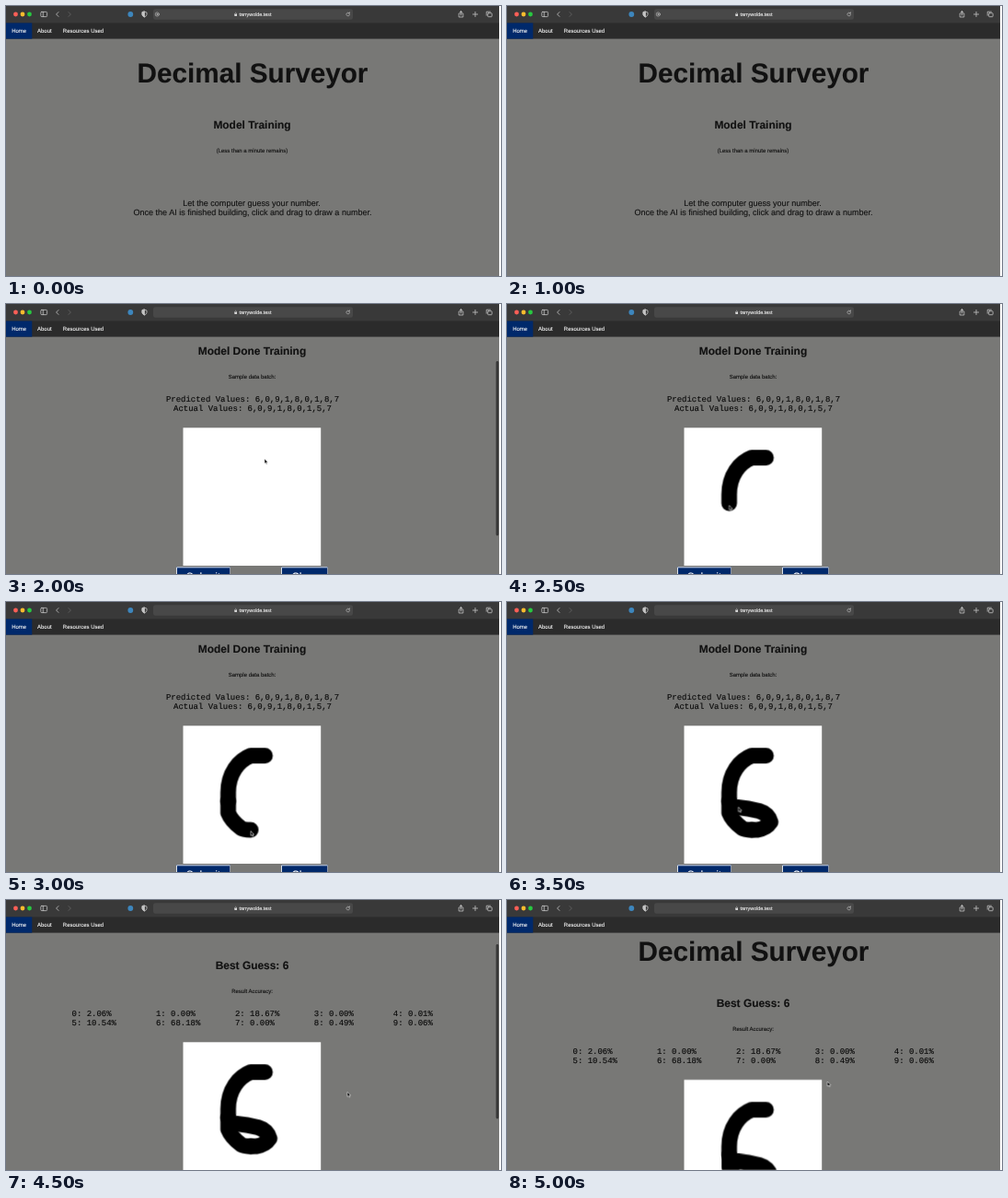
These frames come from a looping animation (538 by 293 pixels, 5500 ms). An HTML page:

```html
<!DOCTYPE html>
<html lang="en">
<head>
<meta charset="utf-8">
<title>Digit guessing demo</title>
<style>
  html, body { margin: 0; width: 100%; height: 100%; overflow: hidden; background: #fff; }
  svg { display: block; width: 538px; height: 293px; }
  text { font-family: "Liberation Sans", Arial, sans-serif; text-rendering: geometricPrecision; white-space: pre; }

  .page text { fill: #111; stroke: #111; stroke-width: .12px; text-anchor: middle; }
  .page .title { font-size: 29.7px; font-weight: bold; }
  .page .heading { font-size: 11.95px; font-weight: bold; }
  .page .note { font-size: 6px; }
  .page .lead { font-size: 9.04px; }
  .page .mono { font: 8.96px "Liberation Mono", "Courier New", monospace; fill: #080808; stroke: #080808; }
  .page .left { text-anchor: start; }
  .page .label { font-size: 12px; fill: #fff; stroke: #fff; }
  .ink path { fill: none; stroke: #000; stroke-width: 17; stroke-linecap: round; stroke-linejoin: round; }
  .lit { fill: none; stroke: #dde2ea; }
  .shade { fill: none; stroke: #8b95a8; }
  .icons { fill: none; stroke: #c4c4c4; stroke-width: .8; stroke-linecap: round; stroke-linejoin: round; }
  .bar text { fill: #f6f6f6; stroke: #f6f6f6; stroke-width: .1px; font-size: 6px; }
  .bar .address { font-size: 5.4px; }

  /* Eleven half-second holds per loop */
  .anim { animation: 5.5s step-end infinite; }
  .page { animation-name: scroll; }
  .training { animation-name: training; }
  .done { animation-name: done; }
  .result { animation-name: result; }
  .board { animation-name: board; }
  .ink1 { animation-name: ink1; }
  .ink2 { animation-name: ink2; }
  .ink3 { animation-name: ink3; }
  .hover { animation-name: hover; }
  .thumb { animation-name: thumb; }
  .info { animation-name: info; }
  .cursor { animation-name: cursor; }

  @keyframes scroll {
    0% { transform: translateY(0); }
    36.363% { transform: translateY(-78px); }
    72.727% { transform: translateY(-109.3px); }
    81.818% { transform: translateY(-58px); }
    90.909%, 100% { transform: translateY(-17.2px); }
  }
  @keyframes training { 0% { opacity: 1; } 27.272%, 100% { opacity: 0; } }
  @keyframes done { 0% { opacity: 0; } 27.272% { opacity: 1; } 81.818%, 100% { opacity: 0; } }
  @keyframes result { 0% { opacity: 0; } 81.818%, 100% { opacity: 1; } }
  @keyframes board { 0% { opacity: 0; } 27.272%, 100% { opacity: 1; } }
  @keyframes ink1 { 0% { opacity: 0; } 45.454%, 100% { opacity: 1; } }
  @keyframes ink2 { 0% { opacity: 0; } 54.545%, 100% { opacity: 1; } }
  @keyframes ink3 { 0% { opacity: 0; } 63.636%, 100% { opacity: 1; } }
  @keyframes hover { 0% { opacity: 0; } 72.727% { opacity: 1; } 81.818%, 100% { opacity: 0; } }
  @keyframes info { 0% { opacity: 1; } 36.363%, 100% { opacity: 0; } }
  @keyframes thumb {
    0% { opacity: 0; transform: translateY(0); }
    36.363% { opacity: 1; transform: translateY(14px); }
    45.454% { opacity: 0; transform: translateY(0); }
    81.818% { opacity: 1; transform: translateY(0); }
    90.909%, 100% { opacity: 0; transform: translateY(0); }
  }
  @keyframes cursor {
    0% { opacity: 0; transform: translate(281px, 168px); }
    36.363% { opacity: 1; transform: translate(281px, 168px); }
    45.454% { opacity: 1; transform: translate(241.5px, 218.5px); }
    54.545% { opacity: 1; transform: translate(266px, 248.5px); }
    63.636% { opacity: 1; transform: translate(251.5px, 222.5px); }
    72.727% { opacity: 1; transform: translate(224.8px, 275.5px); }
    81.818% { opacity: 1; transform: translate(371px, 208.3px); }
    90.909%, 100% { opacity: 1; transform: translate(348.3px, 197px); }
  }
</style>
</head>
<body>
<svg viewBox="0 0 538 293">
  <rect width="536" height="293" fill="#787876"/>

  <g class="page anim">
    <text class="title" x="268" y="82.9">Decimal Surveyor</text>

    <g class="training anim">
      <text class="heading" x="267.5" y="133">Model Training</text>
      <text class="note" x="267.5" y="159">(Less than a minute remains)</text>
      <text class="lead" x="267" y="216.6">Let the computer guess your number.</text>
      <text class="lead" x="268" y="227">Once the AI is finished building, click and drag to draw a number.</text>
    </g>

    <g class="done anim">
      <text class="heading" x="267.5" y="133">Model Done Training</text>
      <text class="note" x="267.5" y="159">Sample data batch:</text>
      <text class="mono" x="268" y="184.1">Predicted Values: 6,0,9,1,8,0,1,8,7</text>
      <text class="mono" x="268" y="194.4">Actual Values: 6,0,9,1,8,0,1,5,7</text>
    </g>

    <g class="result anim">
      <text class="heading" x="267.5" y="133">Best Guess: 6</text>
      <text class="note" x="267.5" y="159">Result Accuracy:</text>
      <text class="mono left" x="71.6" y="184.1">0: 2.06%         1: 0.00%        2: 18.67%       3: 0.00%        4: 0.01%</text>
      <text class="mono left" x="71.6" y="194.4">5: 10.54%        6: 68.18%       7: 0.00%        8: 0.49%        9: 0.06%</text>
    </g>

    <g class="board anim">
      <g class="ink" transform="translate(192.5 212.3)">
        <rect width="149.7" height="149.7" fill="#fff"/>
        <path class="ink1 anim" d="M89 32.5H73.5C60.5 37.5 49 51.5 49 72.5V82"/>
        <path class="ink2 anim" d="M49 82V94.5Q52.5 103.5 63.5 111.5Q65.5 113 73.5 113"/>
        <path class="ink3 anim" d="M73.5 113H79.5Q89.5 111.5 94 104.5Q91.5 95.5 81.5 92.5Q69.5 89.5 58.5 88.5"/>
      </g>
      <g transform="translate(185 363.3)">
        <rect width="59" height="21.5" fill="#00296b"/>
        <rect class="hover anim" width="59" height="21.5" fill="#0a5cff"/>
        <path class="shade" d="M.5 21H58.5V.5"/>
        <path class="lit" d="M.5 21V.5H58.5"/>
        <text class="label" x="29.5" y="15.2">Submit</text>
      </g>
      <g transform="translate(299 363.3)">
        <rect width="51" height="21.5" fill="#00296b"/>
        <path class="shade" d="M.5 21H50.5V.5"/>
        <path class="lit" d="M.5 21V.5H50.5"/>
        <text class="label" x="25.5" y="15.2">Clear</text>
      </g>
    </g>
  </g>

  <rect class="thumb anim" x="532.6" y="48" width="2.8" height="189.5" rx="1.4" fill="#363636"/>

  <g class="bar">
    <rect width="536" height="35.6" fill="#2b2b2b"/>
    <rect width="536" height="18.4" fill="#393939"/>
    <rect y="18.4" width="28.3" height="17.2" fill="#00296b"/>
    <text x="6.2" y="29.2">Home</text>
    <text x="34" y="29.2">About</text>
    <text x="61.8" y="29.2">Resources Used</text>

    <circle cx="10.5" cy="9" r="2.4" fill="#ff5f57"/>
    <circle cx="18" cy="9" r="2.4" fill="#febc2e"/>
    <circle cx="25.5" cy="9" r="2.4" fill="#28c840"/>
    <circle cx="135.3" cy="9" r="2.9" fill="#3d86bd"/>
    <rect x="160" y="3.3" width="217" height="11.4" rx="2.6" fill="#484848"/>
    <text class="address" x="253.5" y="11">tarrywolde.test</text>

    <g class="icons">
      <rect x="37.8" y="6.4" width="6.8" height="5.2" rx="1"/>
      <path d="M40.3 6.4V11.6M57 6.6L54.6 9L57 11.4"/>
      <path d="M68 6.6L70.4 9L68 11.4" stroke="#666"/>
      <path d="M150.5 6.2L153 7V9.3Q152.8 11 150.5 12Q148.2 11 148 9.3V7Z"/>
      <path d="M150.5 6.2V12Q148.2 11 148 9.3V7Z" fill="#c4c4c4"/>
      <g class="info anim"><circle cx="164.3" cy="9" r="2.1" stroke-width=".6"/><circle cx="164.3" cy="9" r=".5"/></g>
      <rect x="248.3" y="8.8" width="2.7" height="2.1" fill="#ddd" stroke="none"/>
      <path d="M248.8 8.8V8Q249.65 6.5 250.5 8V8.8" stroke-width=".6"/>
      <path d="M373.2 8A1.8 1.8 0 1 0 373.5 9.4M373.4 6.8V8.1H372.1" stroke-width=".6"/>
      <path d="M493.5 8H492.2V12H496.8V8H495.5M494.5 10V5.6M493.2 6.8L494.5 5.5L495.8 6.8"/>
      <path d="M507.4 9H512.6M510 6.4V11.6"/>
      <path d="M522.2 10.2V6.2H526.4"/>
      <rect x="523.7" y="7.7" width="4.4" height="4" rx=".6"/>
    </g>
  </g>

  <path class="cursor anim" d="M0 0V5.2L1.2 4.1L2 5.9L2.9 5.5L2.1 3.8H3.7Z" fill="#000" stroke="#e8e8e8" stroke-width=".6"/>
</svg>
</body>
</html>
```
